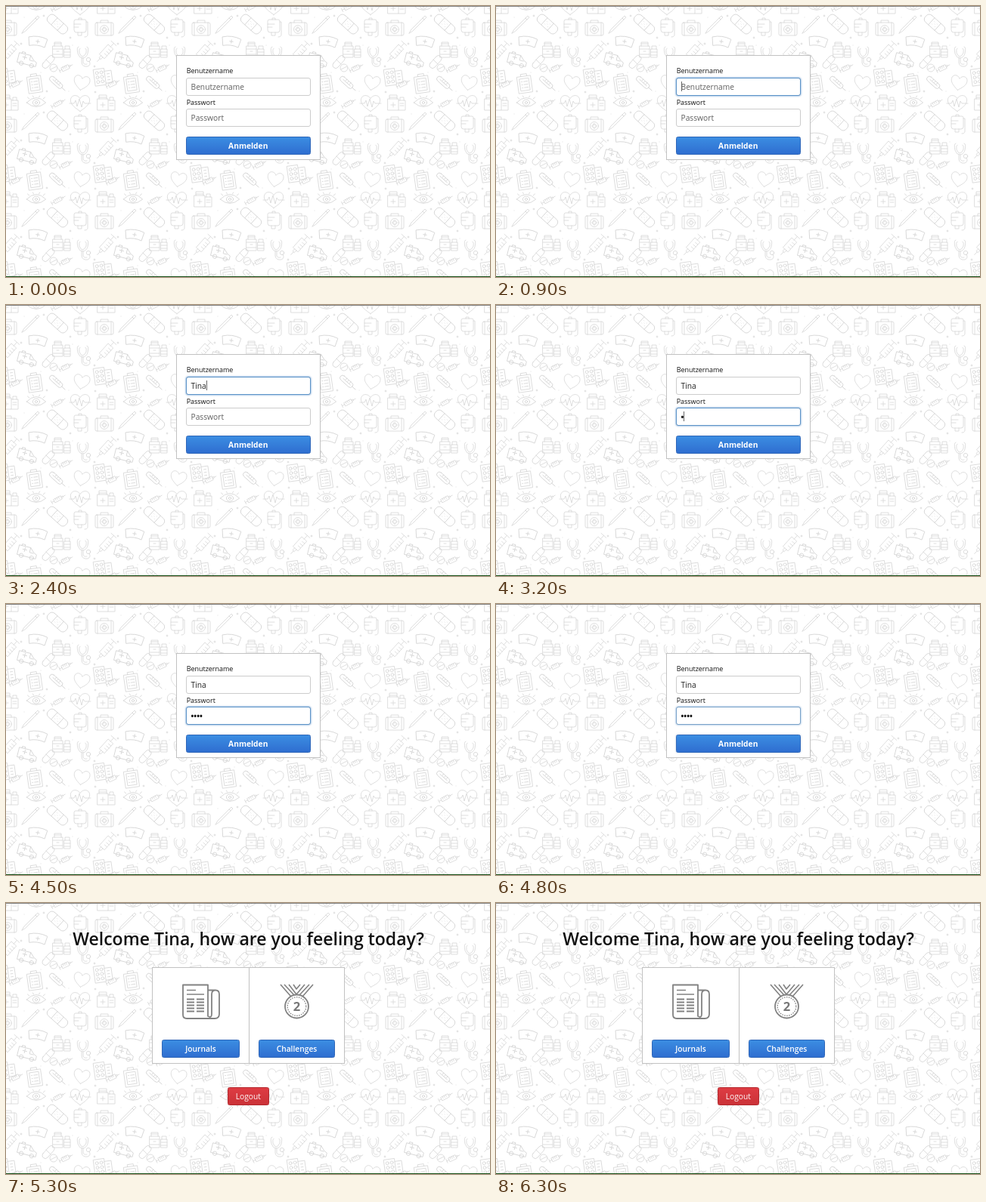
Animation, 640 px wide and 359 px high, one loop 6.4 s. Source, as an HTML page:

```html
<!DOCTYPE html>
<html lang="de">
<head>
<meta charset="utf-8">
<title>Anmeldung</title>
<style>
  html, body { margin: 0; width: 100%; height: 100%; overflow: hidden; background: #fff; }
  #stage {
    position: relative; width: 640px; height: 359px; overflow: hidden;
    font: 10.24px/22px "Open Sans", sans-serif; color: #222;
  }
  #stage > *, .screen > * { position: absolute; box-sizing: border-box; }
  svg { left: 0; top: 0; }
  .screen { inset: 0; }
  .edge { left: 0; width: 100%; height: 1px; }
  .panel { background: #fff; border: 1px solid #c2c2c2; }
  .label { left: 238.7px; font-size: 8.96px; line-height: 13px; color: #111; }
  .field {
    left: 238px; width: 164.5px; height: 24px; padding-left: 5.5px;
    border: 1px solid #ccc; border-radius: 3px; background: #fff; white-space: pre;
  }
  .hint { color: #606060; }
  .caret {
    display: inline-block; width: 1px; height: 13px; margin-right: -1px;
    vertical-align: -2px; background: #666;
  }
  #pass .text { font-weight: 700; color: #111; }
  .button {
    height: 24px; border: 1px solid #2f66b8; border-radius: 2.5px; color: #fff;
    background: linear-gradient(#3b8de2, #2f6ed0); font-weight: 600; text-align: center;
  }
  #submit { font-weight: 700; }
  .button.red { border-color: #b32a30; background: linear-gradient(#de3c43, #cb3238); font-weight: 500; }
  .focus::after {
    content: ""; position: absolute; inset: -1px; border: 1px solid #5c93c8; border-radius: 3px;
    box-shadow: 0 0 2px .5px rgba(95, 150, 205, .7); opacity: var(--focus, 0);
  }
  .button.focus::after { border-color: #3f78c0; box-shadow: 0 0 2px 1px rgba(85, 125, 175, .65); }
  h1 {
    margin: 0; left: 0; top: 32px; width: 641px; text-align: center; white-space: nowrap;
    font-size: 23.04px; line-height: 30px; font-weight: 600; color: #111;
  }
</style>
</head>
<body>
<div id="stage">
  <svg width="640" height="359" fill="none" stroke="#d6d6d6" stroke-width=".8" stroke-linejoin="round" stroke-linecap="round">
    <defs>
      <path id="heart" vector-effect="non-scaling-stroke" d="M0 10C-5 6-11 2-11-4C-11-11-3-12 0-6C3-12 11-11 11-4C11 2 5 6 0 10Z"/>
      <path id="needle" vector-effect="non-scaling-stroke" d="M-7-3H6V3H-7ZM6-1H9V1H6M9 0H13M-7 0H-12M-12-3V3M-4-3V0M-1-3V0M2-3V0"/>
      <g id="tile">
        <g transform="translate(68 24) rotate(42) scale(1.12)">
          <rect x="-14" y="-5.5" width="28" height="11" rx="4.5"/>
          <path d="M-5-5.5V5.5M5-5.5V5.5M-2-2h.1M2-2h.1M-2 2h.1M2 2h.1M0 0h.1"/>
        </g>
        <g transform="translate(98 28)">
          <path d="M-8-8Q-8-10-6-10H6Q8-10 8-8V4Q8 7 5 7H-5Q-8 7-8 4ZM-2-10V-12H2V-10M-8-4H1M-8 0H-2M-3 7V11H2V7M8-7H10V10Q10 13 6 13"/>
        </g>
        <g transform="translate(2 29)">
          <rect x="-12" y="-7" width="24" height="17" rx="2"/>
          <circle cy="2" r="5.5"/>
          <path d="M-5-7V-10H5V-7M-1-1H1V1H3V3H1V5H-1V3H-3V1H-1ZM-9-7V10M9-7V10"/>
        </g>
        <path d="M21 36L24 31L42 13L44 15L26 33ZM39 16L41 18"/>
        <g transform="translate(42 47) rotate(8) scale(1.12)">
          <path d="M-11-4Q0-8 11-4L9 6Q0 3-9 6ZM-2 0H2M0-2V2"/>
        </g>
        <g transform="translate(73 58)">
          <path d="M-11-5H2V10H-11ZM-9-5V-10H0V-5M-9-8H0M-11-1H2M-11 6H2M-6 2H-3M4-1H12V10H4ZM5-1V-5H11V-1M4 3H12M4 7H12"/>
        </g>
        <g transform="translate(104 66)">
          <path d="M-8-12Q-11-12-9-3Q-7 3-3 3Q2 3 4-3Q6-12 3-12M-6-10Q-8-9-7-4Q-5 1-3 1Q0 1 2-4Q3-9 1-10M-4 3V9Q-3 15 4 14Q9 12 6 7M-2 3V9Q-1 12 3 11"/>
          <circle cx="5" cy="5" r="2.7"/>
        </g>
        <use href="#needle" transform="translate(4 61) rotate(132) scale(1.3 1.5)"/>
        <g transform="translate(28 71) rotate(14) scale(1.08)">
          <path d="M-11-6H3L8-1L12 1V6H-11ZM3-6V0H8M-6-2H-1M-3.5-4.5V.5M-8-6V-8H-4V-6"/>
          <circle cx="-6" cy="6" r="2.5"/><circle cx="7" cy="6" r="2.5"/>
        </g>
        <g transform="translate(57 77)">
          <rect x="-10" y="-4" width="20" height="8" rx="4" transform="translate(-1 -3) rotate(-48)"/>
          <path d="M-4-6L2 0"/>
          <circle cx="6" cy="5" r="5"/><path d="M2 7L10 3"/>
        </g>
        <use href="#needle" transform="translate(79 82) rotate(-25) scale(.75 .9)"/>
        <use href="#needle" transform="translate(13 103) rotate(-25) scale(.75 .9)"/>
        <use href="#heart" transform="translate(100 102) rotate(10) scale(.95)"/>
        <g transform="translate(38 103) rotate(-8)">
          <path d="M-9-10H9V12H-9ZM-4-10V-13H4V-10M-6-7H6V9H-6ZM-1-3H4M-1 1H4M-1 5H4M-4-3H-3M-4 1H-3M-4 5H-3"/>
        </g>
        <g transform="translate(67 102) rotate(42) scale(1.15)">
          <rect x="-10" y="-3" width="18" height="6" rx="3"/>
          <path d="M8 0H13M-6 0H5M-3-3V-1M0-3V-1M3-3V-1"/>
        </g>
        <g transform="translate(-2 94) rotate(-8)">
          <path d="M-9-11H5V11H-9ZM5-7H14V9H5"/>
          <g id="blister"><circle cx="-5" cy="-6" r="2"/><circle cx="1" cy="-6" r="2"/></g>
          <use href="#blister" y="6"/><use href="#blister" y="12"/>
          <path d="M8-3H11M8 1H11M8 5H11"/>
        </g>
        <g transform="translate(40 128) scale(1.15 1)">
          <path d="M-11 0Q0-13 11 0Q0 11-11 0ZM-8-5L-10-7M-3-7L-4-9M3-7L4-9M8-5L10-7"/>
          <circle r="4"/><circle r="1.5"/>
        </g>
        <g transform="translate(4 128)">
          <path d="M-11-5H3V10H-11ZM-9-5V-10H1V-5M-9-7H1M-4 0V6M-7 3H-1M3-3H12V10H3M5-3V-7H10V-3M5 1H10M5 4H10"/>
        </g>
        <g transform="translate(98 129)">
          <use href="#heart" transform="scale(1.15 1.05)"/>
          <path d="M-14 0H-8L-6-4L-4 4L-1-6L2 5L4-3L6 0H14"/>
        </g>
        <use href="#needle" transform="translate(69 129) rotate(-28) scale(.8)"/>
        <path d="M49 13h2M50 12v2M84 42h2M85 41v2M19 50h2M20 49v2M53 113h2M54 112v2M117 114h2M118 113v2M116 80h2M117 79v2M83 113h.1M46 88h.1M88 52h.1M24 15h.1"/>
      </g>
    </defs>
    <g id="wall"></g>
  </svg>

  <div class="screen" id="login">
    <div class="panel" style="left:225px;top:64.5px;width:191px;height:139.5px"></div>
    <div class="label" style="top:79px">Benutzername</div>
    <div class="field focus" id="user" style="top:95px"><span class="text"></span><i class="caret"></i><span class="hint">Benutzername</span></div>
    <div class="label" style="top:121px">Passwort</div>
    <div class="field focus" id="pass" style="top:136px"><span class="text"></span><i class="caret"></i><span class="hint">Passwort</span></div>
    <div class="button focus" id="submit" style="left:238px;top:173px;width:164.5px;height:23.5px">Anmelden</div>
  </div>

  <div class="screen" id="home">
    <h1>Welcome Tina, how are you feeling today?</h1>
    <div class="panel" style="left:193px;top:85px;width:129px;height:128px"></div>
    <div class="panel" style="left:321px;top:85px;width:127px;height:128px"></div>
    <svg width="640" height="359" fill="none" stroke="#828282" stroke-width="1.8" stroke-linejoin="round">
      <path d="M267 146V108.500H234V148Q234 153 239 153H276Q282 153 282 147V121Q282 115.500 277 115.500Q272 115.500 272 121V147Q272 153 267 150V115.500H277"/>
      <path stroke-width="1.5" d="M239 115.500H251M239 121H262"/>
      <path stroke-width="2" d="M239 127.500H249M239 131.500H249M239 135.500H249M239 139.500H249M239 143.500H249M252 127.500H262M252 131.500H262M252 135.500H262M252 139.500H262M252 143.500H262"/>
      <path stroke-width="1.6" d="M363 108L377 124M368 108L381 122M374 108L384 121M406 108L392 124M401 108L388 122M395 108L384 121M380 108L384 114L389 108"/>
      <circle cx="384.500" cy="137" r="15.500"/>
      <circle cx="384.500" cy="137" r="12.300" stroke-width="1.300" stroke-dasharray="1.5 1.5"/>
      <text x="384.500" y="143" text-anchor="middle" fill="#777" stroke="none" font-size="16.500" font-weight="700">2</text>
    </svg>
    <div class="button" style="left:206px;top:181px;width:103px">Journals</div>
    <div class="button" style="left:334px;top:181px;width:101px">Challenges</div>
    <div class="button red" style="left:292.500px;top:244px;width:55.500px">Logout</div>
  </div>

  <div class="edge" style="top:0;background:#858585"></div>
  <div class="edge" style="top:358px;background:#164f16"></div>
</div>

<script>
  const LOOP = 6400, STEP = 100, HOME_AT = 5300;
  const $ = id => document.getElementById(id);

  for (let y = -128; y < 359; y += 128)
    for (let x = -128; x <= 640; x += 128) {
      const tile = document.createElementNS("http://www.w3.org/2000/svg", "use");
      tile.setAttribute("href", "#tile");
      tile.setAttribute("transform", `translate(${x} ${y})`);
      $("wall").append(tile);
    }

  const ramp = (t, start) => Math.min(1, Math.max(0, (t - start) / 200));
  const within = (t, from, to) => t >= from && t < to;
  const typed = (text, times, t) => text.slice(0, times.filter(at => t >= at).length);

  function setField(id, text, caretOn, focus) {
    const field = $(id);
    field.querySelector(".text").textContent = text;
    field.querySelector(".hint").hidden = text !== "";
    field.querySelector(".caret").style.opacity = caretOn ? 1 : 0;
    field.style.setProperty("--focus", focus);
  }

  function draw(now) {
    const t = Math.floor(now % LOOP / STEP) * STEP;
    const toPass = ramp(t, 2750), toButton = ramp(t, 4750);

    setField("user", typed("Tina", [1800, 2100, 2200, 2400], t),
      within(t, 900, 1400) || within(t, 1800, 2800), t < 900 ? 0 : 1 - toPass);
    setField("pass", typed("••••", [3200, 3300, 3600, 3800], t),
      within(t, 2900, 4300), toPass - toButton);
    $("submit").style.setProperty("--focus", toButton);

    $("login").style.visibility = t < HOME_AT ? "visible" : "hidden";
    $("home").style.visibility = t < HOME_AT ? "hidden" : "visible";
  }

  const start = performance.now();
  function tick() {
    draw(performance.now() - start);
    requestAnimationFrame(tick);
  }
  tick();
</script>
</body>
</html>
```
